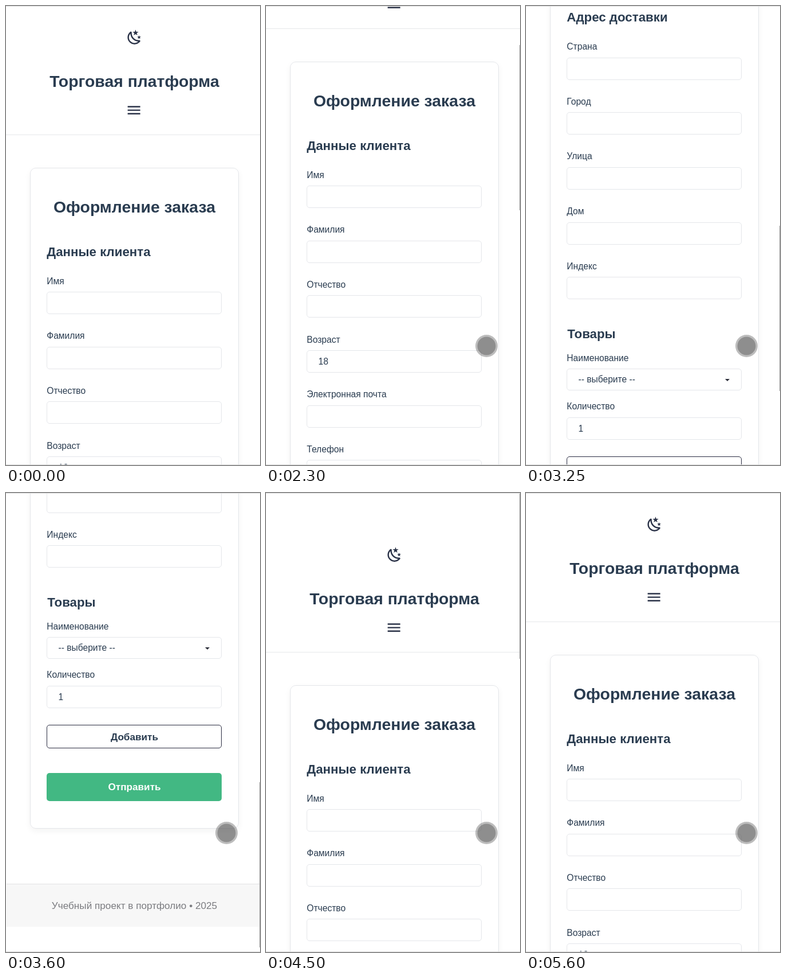
Animation, 444 px wide and 800 px high, one loop 5700 ms. Source, as an HTML page with a canvas:

```html
<!DOCTYPE html>
<html lang="ru">
<head>
<meta charset="utf-8">
<title>Оформление заказа</title>
<style>
  html, body { margin: 0; width: 100%; height: 100%; overflow: hidden; background: #fff; }
  #stage {
    position: relative; width: 444px; height: 800px; overflow: hidden;
    background: #fff; color: #2a3c50;
    font-family: "Liberation Sans", Arial, sans-serif; font-size: 15.61px;
  }
  #stage *, #stage { box-sizing: border-box; }
  #page { position: absolute; left: 0; top: 0; width: 444px; height: 2194px; will-change: transform; }
  #page > * { position: absolute; }
  .text { line-height: 40px; white-space: nowrap; }
  .center { left: 0; width: 449px; text-align: center; }
  .h1 { font-size: 28.4px; font-weight: bold; }
  .h2 { font-size: 22.3px; font-weight: bold; }
  .note { font-size: 17.17px; color: #7b7c80; }
  .btn { font-size: 17.17px; font-weight: bold; }
  .box { left: 71px; width: 306px; border: 1px solid #e4e6ea; border-radius: 5px; background: #fff; }
  .add { border-color: #2b2d42; }
  .send { border: 0; background: #42b883; }
  #head { left: 0; top: 224px; width: 444px; height: 1px; background: #e6e8ea; }
  #card {
    left: 42px; top: 282px; width: 365px; height: 1741px;
    border: 1px solid #e4e6ea; border-radius: 10px;
    box-shadow: 0 4px 12px rgba(0, 0, 0, .05);
  }
  #foot { left: 1px; top: 2119px; width: 443px; height: 75px; background: #f7f7f7; border-top: 1px solid #e2e2e4; }
  svg { width: 29.3px; height: 29.3px; fill: #2b3348; }
  .edge { position: absolute; left: 0; width: 444px; height: 1px; background: #dedede; }
  #thumb { position: absolute; left: 442.6px; width: 1.4px; height: 288px; background: #a2a2a2; }
  #touch { position: absolute; left: 365px; top: 572px; }
</style>
</head>
<body>
<div id="stage">
  <div id="page">
    <svg viewBox="0 0 24 24" style="left:210.2px;top:39.8px">
      <path id="star" d="M17.75 4.09 15.22 6.03 16.13 9.09 13.5 7.28 10.87 9.09 11.78 6.03 9.25 4.09 12.44 4 13.5 1 14.56 4Z"/>
      <use href="#star" transform="translate(9.766 8.353) scale(.647)"/>
      <path d="M18.97 15.95C19.8 15.87 20.69 17.05 20.16 17.8 19.84 18.25 19.5 18.67 19.08 19.07 15.17 23 8.84 23 4.94 19.07 1.03 15.17 1.03 8.83 4.94 4.93 5.34 4.53 5.76 4.17 6.21 3.85 6.96 3.32 8.14 4.21 8.06 5.04 7.79 7.9 8.75 10.87 10.95 13.06 13.14 15.26 16.1 16.22 18.97 15.95M17.33 17.97C14.5 17.81 11.7 16.64 9.53 14.5 7.36 12.31 6.2 9.5 6.04 6.68 3.23 9.82 3.34 14.64 6.35 17.66 9.37 20.67 14.19 20.78 17.33 17.97Z"/>
    </svg>
    <svg viewBox="0 0 24 24" style="left:209.4px;top:167.4px">
      <path d="M3 6h18v2H3zM3 11h18v2H3zM3 16h18v2H3z"/>
    </svg>
    <div id="head"></div>
    <div id="card"></div>
    <div id="foot"></div>
  </div>
  <div id="thumb"></div>
  <canvas id="touch" width="41" height="41"></canvas>
  <div class="edge" style="top:0"></div>
  <div class="edge" style="top:799px"></div>
</div>
<script>
const LOOP = 5700, STEP = 50, MAX = 1394, PITCH = 95.67;
const $ = id => document.getElementById(id);
const page = $('page'), thumb = $('thumb'), touch = $('touch');

function add(cls, top, css = {}, str = '') {
  const el = document.createElement('div');
  el.className = cls;
  el.textContent = str;
  Object.assign(el.style, { top: top + 'px' }, css);
  page.append(el);
}
// Text is placed by the middle of its line
const text = (str, mid, cls = '', x = 71.3) =>
  add('text ' + cls, mid - 20, cls.includes('center') ? {} : { left: x + 'px' }, str);
const box = (top, h, cls = '') => add('box ' + cls, Math.round(top), { height: h + 'px' });

function fields(names, mid) {
  names.forEach((name, i) => {
    const y = mid + i * PITCH;
    text(name, y);
    box(y + 18.6, 39);
  });
}

text('Торговая платформа', 130.5, 'h1 center');
text('Оформление заказа', 350, 'h1 center');
text('Данные клиента', 428.5, 'h2');
fields(['Имя', 'Фамилия', 'Отчество', 'Возраст', 'Электронная почта', 'Телефон'], 479.5);
text('18', 805.3, '', 91.5);
text('Адрес доставки', 1076.5, 'h2');
fields(['Страна', 'Город', 'Улица', 'Дом', 'Индекс'], 1128);
text('Товары', 1629, 'h2', 72.3);
text('Наименование', 1670.5);
box(1689, 38);
text('-- выберите --', 1708.3, '', 91.5);
add('', 1706.5, {
  left: '347.5px', width: 0, height: 0,
  border: '4.7px solid transparent', borderTopColor: '#2b2d38', borderBottom: 0
});
text('Количество', 1755);
box(1774, 39);
text('1', 1794, '', 91.5);
box(1842, 41, 'add');
text('Добавить', 1862.5, 'btn center');
box(1926, 49, 'send');
text('Отправить', 1950.3, 'btn center');
page.lastChild.style.color = '#fff';
text('Учебный проект в портфолио • 2025', 2156.5, 'note center');

const ctx = touch.getContext('2d');
for (const [r, alpha] of [[19.5, .4], [16, .48]]) {
  ctx.fillStyle = `rgba(90,90,90,${alpha})`;
  ctx.beginPath();
  ctx.arc(20.5, 20.5, r, 0, 7);
  ctx.fill();
}

// Scroll offset over time, with elastic overshoot at both ends
const keys = [
  [0, 0], [2050, 0], [2150, 30], [2300, 185], [3250, 1057], [3500, 1375],
  [3600, 1438], [3680, 1450], [3950, 1409], [4100, 1396], [4150, MAX],
  [4250, 1080], [4350, 520], [4450, 20], [4500, -53], [4550, -72],
  [4700, -46], [4950, -14], [5200, -1], [5250, 0], [LOOP, 0]
];
const slope = (a, b) => (b[1] - a[1]) / (b[0] - a[0]);
function tangent(i) {
  if (!i || i === keys.length - 1) return 0;
  const [a, b, c] = keys.slice(i - 1, i + 2);
  return slope(a, b) * slope(b, c) <= 0 ? 0 : slope(a, c);
}
function scrollAt(t) {
  const i = keys.findIndex(k => k[0] > t) - 1;
  const [t0, y0] = keys[i], [t1, y1] = keys[i + 1];
  const d = t1 - t0, u = (t - t0) / d, v = 1 - u;
  return v * v * (1 + 2 * u) * y0 + u * u * (1 + 2 * v) * y1
    + u * v * d * (v * tangent(i) - u * tangent(i + 1));
}
const clamp = (x, lo, hi) => Math.min(hi, Math.max(lo, x));

function draw(t) {
  const y = scrollAt(t);
  page.style.transform = `translateY(${-Math.round(y)}px)`;
  thumb.style.top = 1 + .361 * clamp(y, 0, MAX) + 'px';
  thumb.style.opacity = t <= 2050 ? 0 : clamp((5250 - t) / 200, 0, 1);
  touch.style.visibility = t >= 1750 ? 'visible' : 'hidden';
}

const start = performance.now();
function tick() {
  const t = (performance.now() - start) % LOOP;
  draw(Math.floor(t / STEP) * STEP);
  requestAnimationFrame(tick);
}
tick();
</script>
</body>
</html>
```
